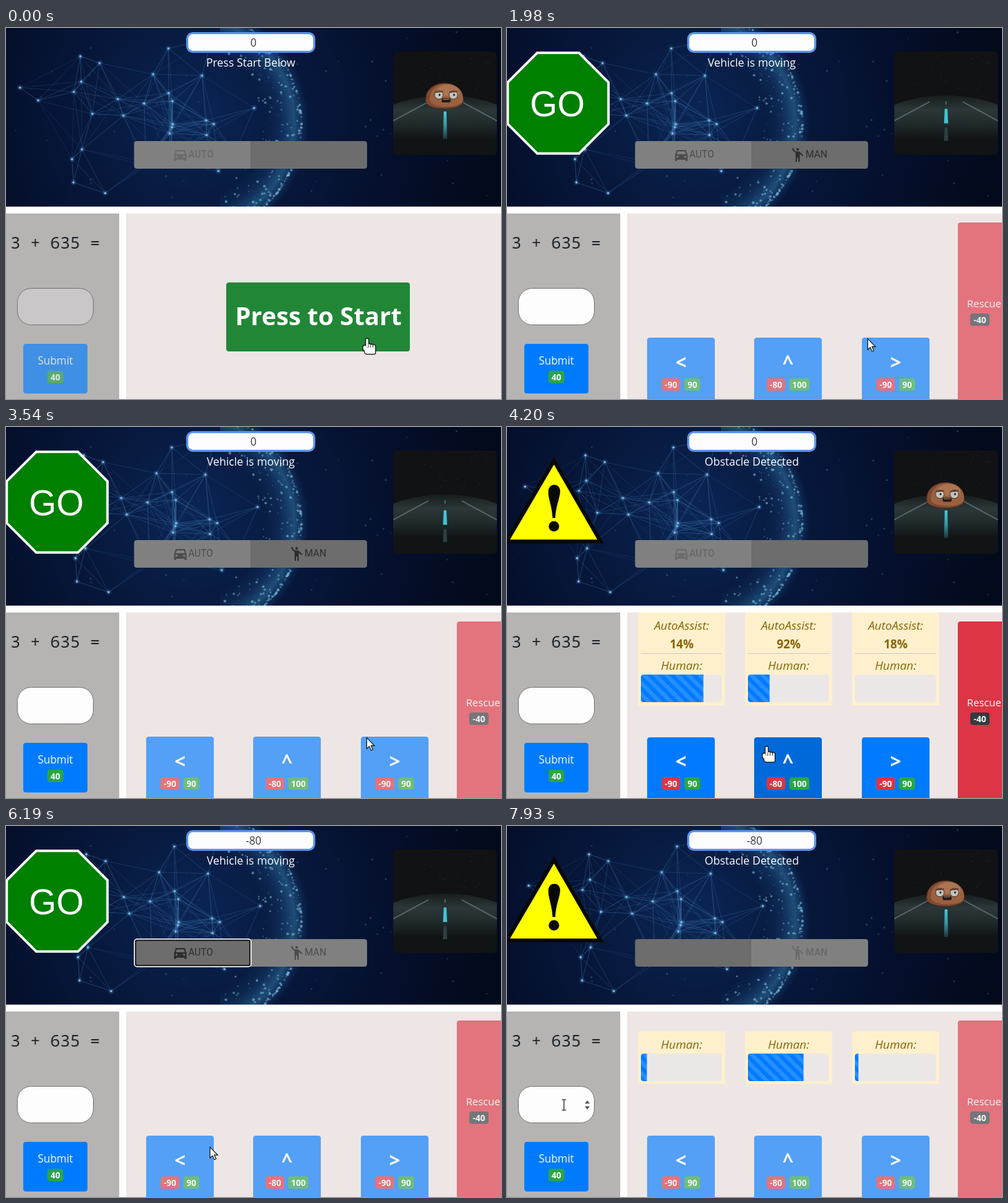
An HTML page with a canvas for the animation above (8000 ms loop, 717 by 538 pixels).

```html
<!DOCTYPE html>
<html lang="en">
<head>
<meta charset="utf-8">
<title>Vehicle control game</title>
<style>
html, body { margin: 0; width: 100%; height: 100%; overflow: hidden; background: #fff; }
canvas { display: block; }
</style>
</head>
<body>
<canvas id="stage" width="717" height="538"></canvas>
<script>
const c = document.getElementById('stage').getContext('2d');
const SANS = '"Open Sans", "Noto Sans", sans-serif';
const PAGE = '#eee6e5', SIDE = '#b5b4b3';
const LOOP = 8000, GO_1 = 1500, STOP_1 = 3660, VOTE = 4590, GO_2 = 4650, AUTO_ON = 5290, STOP_2 = 7400;

const clamp = v => Math.max(0, Math.min(1, v));
const ease = v => { v = clamp(v); return v * v * (3 - 2 * v); };
const mix = (a, b, k) => a + (b - a) * k;
const grey = v => `rgb(${v},${v},${v})`;
const times = (n, make) => Array.from({ length: n }, (_, i) => make(i));

function seeded(seed) {
  return () => (seed = (seed * 16807) % 2147483647) / 2147483647;
}
function paint(fill, stroke, width = 1) {
  if (fill) { c.fillStyle = fill; c.fill(); }
  if (stroke) { c.strokeStyle = stroke; c.lineWidth = width; c.stroke(); }
}
function box(x, y, w, h, r, ...style) {
  c.beginPath();
  c.roundRect(x, y, w, h, r);
  paint(...style);
}
function shape(points, ...style) {
  c.beginPath();
  points.forEach(p => c.lineTo(...p));
  c.closePath();
  paint(...style);
}
function disc(x, y, r, ...style) {
  c.beginPath();
  c.arc(x, y, r, 0, 7);
  paint(...style);
}
function line(x1, y1, x2, y2, color, width = 1) {
  c.beginPath();
  c.moveTo(x1, y1);
  c.lineTo(x2, y2);
  paint(null, color, width);
}
function ramp(gradient, ...colors) {
  colors.forEach((color, i) => gradient.addColorStop(i / (colors.length - 1), color));
  return gradient;
}
// Draws in a frame of its own: moved to x, y and cut to w, h when given
function local(x, y, draw, w, h, r = 0) {
  c.save();
  c.translate(x, y);
  if (w) { box(0, 0, w, h, r); c.clip(); }
  draw();
  c.restore();
}
function text(s, x, y, font, color = '#fff', align = 'center') {
  c.font = font;
  c.textAlign = align;
  c.fillStyle = color;
  c.fillText(s, x, y);
}
const sans = (size, weight = 400, style = '') => `${style} ${weight} ${size}px ${SANS}`;

function badge(s, x, y, w, color) {
  box(x, y, w, 18, 4, color);
  text(s, x + w / 2, y + 13.5, sans(12.3, 700));
}
// Veils a disabled control with the colour behind it
function veil(x, y, w, h, color) {
  c.globalAlpha = 0.35;
  c.fillStyle = color;
  c.fillRect(x, y, w, h);
  c.globalAlpha = 1;
}

// Network globe
const rnd = seeded(71);
const hubs = [[213, 67], [162, 103], [110, 176], [237, 153], [284, 69], [290, 134], [170, 127], [241, 106]];
const nodes = hubs.concat(times(24, () => [20 + 340 * rnd(), 255 * rnd()]));
const links = [];
nodes.forEach((a, i) => nodes.slice(0, i).forEach(b => {
  const d = Math.hypot(a[0] - b[0], a[1] - b[1]);
  if (d < 100) links.push([a, b, 0.5 - d / 260]);
}));
const limb = times(380, () => ({ a: rnd() * 2.3 - 1.15, r: 163 - 60 * rnd() ** 4, k: rnd() }));
const stars = times(60, () => [rnd() * 717, rnd() * 259, rnd()]);

function globe(t) {
  c.fillStyle = ramp(c.createRadialGradient(270, 125, 20, 280, 130, 430), '#0a2452', '#07183c', '#050f2c', '#030a1c');
  c.fillRect(0, 0, 717, 259);
  for (const [x, y, k] of stars) disc(x, y, 0.5 + k, `rgba(75,115,165,${0.12 + 0.3 * k})`);

  c.fillStyle = ramp(c.createRadialGradient(265, 138, 110, 265, 138, 174),
    'rgba(40,110,175,0)', 'rgba(45,120,180,.15)', 'rgba(60,140,190,.45)', 'rgba(30,90,150,0)');
  c.fillRect(310, 0, 130, 259);
  for (const { a, r, k } of limb) {
    const turn = a + 0.01 * Math.sin(t / 1500 + 6 * k);
    disc(265 + r * Math.cos(turn), 138 + r * Math.sin(turn), 0.6 + 1.4 * k, `rgba(125,195,225,${0.15 + 0.5 * k})`);
  }

  const drift = x => x + t * 0.0014;
  for (const [a, b, k] of links) line(drift(a[0]), a[1], drift(b[0]), b[1], `rgba(80,145,200,${k})`);
  for (const [x, y] of nodes) {
    disc(drift(x), y, 4, 'rgba(80,150,215,.2)');
    disc(drift(x), y, 1.7, '#79b8de');
  }
}

// Road view, 150 by 150
function road(t, blocked) {
  c.fillStyle = '#111213';
  c.fillRect(0, 0, 150, 150);
  const r = seeded(9);
  times(26, () => disc(r() * 150, r() * 56, 0.5, 'rgba(150,160,165,.3)'));
  c.beginPath();
  c.ellipse(75, 116, 112, 52, 0, 0, 7);
  paint(ramp(c.createLinearGradient(0, 64, 0, 126), '#181d1e', '#2b3738', '#202a2b', '#111415'));
  for (const side of [-1, 1]) line(75 + side * 24, 73, 75 + side * 76, 101, 'rgba(125,150,150,.55)', 1.8);

  const dash = (y, h, fill) => shape([[73, y], [77, y], [78, y + h], [72, y + h]], fill);
  if (blocked) {
    dash(87, 40, ramp(c.createLinearGradient(0, 87, 0, 127), '#45c9d8', '#3797a2', '#1d3438'));
    rock(Math.sin(t / 130) * 0.6);
  } else {
    const shift = 2 + 2.5 * Math.sin(t / 110);
    line(75, 72, 75, 77, '#477b80', 1.5);
    dash(83 + shift, 21, '#42c3d0');
    dash(110 + shift, 19, '#2c4144');
  }
}
function blob(x, y, w, up, down, ...style) {
  shape(times(40, i => {
    const a = i / 40 * 2 * Math.PI, s = Math.sin(a);
    return [x + w * Math.cos(a) * (1 + 0.12 * s), y + (s < 0 ? up : down) * Math.sign(s) * Math.abs(s) ** 0.8];
  }), ...style);
}
function rock(dy) {
  local(74, 68 + dy, () => {
    blob(0, 0, 27, 22, 15, '#80492f', '#4c2d20');
    blob(3, -1, 24, 20, 13, '#99613f');
    blob(5, -8, 17, 12, 5, '#ad7451');
    for (const x of [-8, 13]) {
      disc(x, -5, 6.2, '#c2c4bd', '#49352d');
      disc(x + 1, -5, 1.4, '#181818');
      line(x - 6, -9, x + 6, -10, '#5f3b2a', 2);
    }
    box(-4, 0, 13, 6, 2, '#2b1915');
    line(-2, 1.5, 7, 1.5, '#8f887c');
  });
}

// Signs
function goSign() {
  shape(times(8, k => {
    const a = (k + 0.5) * Math.PI / 4;
    return [74 + 79 * Math.cos(a), 109 + 79 * Math.sin(a)];
  }), '#008000', '#fff', 3.5);
  text('GO', 73, 128, '51px "Liberation Sans", Arial, sans-serif');
}
function warnSign() {
  shape([[68, 49], [-0.5, 166], [135.5, 166]], '#ff0', '#080808', 5.5);
  c.beginPath();
  c.moveTo(66, 132);
  c.bezierCurveTo(65, 112, 59, 104, 60, 92);
  c.bezierCurveTo(61, 81, 76, 81, 77, 92);
  c.bezierCurveTo(77, 104, 71, 112, 70, 132);
  paint('#080808');
  disc(68, 144, 7.6, '#080808');
}

// Mode switch, icons on a 24 pixel grid
function car(ink) {
  c.beginPath();
  c.roundRect(3, 11, 18, 8, 1);
  for (const x of [6.5, 17.5]) {
    c.moveTo(x + 1.5, 14.5);
    c.arc(x, 14.5, 1.5, 0, 7);
  }
  c.fillStyle = ink;
  c.fill('evenodd');
  shape([[4.2, 12], [6, 6], [18, 6], [19.8, 12]], null, ink, 2);
  for (const x of [3, 18]) box(x, 17, 3, 4, 1, ink);
}
function man(ink) {
  disc(12, 4, 2, ink);
  c.strokeStyle = ink;
  c.lineWidth = 2;
  c.stroke(new Path2D('M5 2Q5.5 8 11 8H14L19.6 13.3'));
  c.fillStyle = ink;
  c.fillRect(9, 7, 6, 9);
  for (const x of [9, 13]) c.fillRect(x, 15, 2, 7);
}
function modeSwitch(auto, moving, focused) {
  const half = (x, on, corners, icon, label) => {
    box(x, 164, 169, 40, corners, grey(mix(128, 109, on)));
    if (!moving && on > 0.5) return;
    const ink = moving ? grey(mix(76, 46, on)) : grey(107);
    local(x + 55, 172, () => icon(ink));
    text(label, x + 78.5, 188, `${moving ? 400 : 600} 14px Roboto, sans-serif`, ink, 'left');
  };
  half(185.5, auto, [4, 0, 0, 4], car, 'AUTO');
  half(354, 1 - auto, [0, 4, 4, 0], man, 'MAN');
  if (focused) {
    box(187.5, 165.5, 166, 37, 3, null, '#101010', 2);
    box(186, 164, 169, 40, 4, null, '#fff', 1.5);
  }
}

// Lower panels
function mathPanel(enabled) {
  c.fillStyle = SIDE;
  c.fillRect(0, 269, 164, 269);
  text('3 + 635 =', 6.5, 320, '24px "Noto Sans Mono", monospace', '#212529', 'left');
  box(16.5, 377.5, 110, 53, 20, enabled ? '#fdfdfd' : '#c9c7c8', '#777');
  box(25, 458, 93, 72, 4, '#007bff');
  text('Submit', 71.5, 488, sans(15.4));
  badge('40', 60, 497, 23, '#28a745');
  if (!enabled) veil(25, 458, 93, 72, SIDE);
}
function votes(x, assist, share) {
  const w = 126, y = assist ? 359 : 330, mid = x + w / 2;
  c.fillStyle = '#fff0cd';
  if (assist) {
    c.fillRect(x, 269, w, 135);
    text('AutoAssist:', mid, 293.5, sans(17, 400, 'italic'), '#856404');
    text(assist, mid, 320.5, sans(17, 700), '#856404');
    line(x + 4, 328.5, x + w - 5, 328.5, '#cfcbc4');
  } else c.fillRect(x, 298, w, 76);
  text('Human:', mid, y - 7.5, sans(17, 400, 'italic'), '#856404');
  box(x + 4, y, w - 9, 40, 4, '#ebe7e6');
  const fill = (w - 9) * share;
  if (fill) local(x + 4, y, () => {
    c.fillStyle = '#007bff';
    c.fillRect(0, 0, fill, 40);
    for (let sx = -48; sx < fill; sx += 16)
      shape([[sx, 0], [sx + 8, 0], [sx + 48, 40], [sx + 40, 40]], 'rgba(255,255,255,.15)');
  }, fill, 40, [4, 0, 0, 4]);
}
const SIGNS = ['<', '^', '>'];
const buttonX = i => Math.round(203 + 155.4 * i);
function controls(active, hover) {
  SIGNS.forEach((sign, i) => {
    const x = buttonX(i), up = i === 1;
    box(x, active ? 450 : 449, 98, 100, 4, active && hover === i ? '#0069d9' : '#007bff');
    text(sign, x + 49, 495, sans(28, 700));
    badge(up ? '-80' : '-90', x + (up ? 18 : 21), 508, 27, '#dc3545');
    badge(up ? '100' : '90', x + (up ? 51 : 54), 508, up ? 29 : 23, '#28a745');
  });
  box(653, 282, 76, 270, 4, '#dc3545');
  text('Rescue', 691, 405, sans(15));
  badge('-40', 671, 414, 28, '#343a40');
  if (!active) veil(174, 269, 543, 269, PAGE);
}

function toast(age) {
  if (age < 0 || age > 1300) return;
  local(13 - 345 * (1 - ease(age / 250)) - 360 * ease((age - 1000) / 300), 0, () => {
    c.fillStyle = '#e74c3c';
    c.fillRect(0, 0, 312, 57);
    c.fillStyle = 'rgba(255,255,255,.7)';
    c.fillRect(0, 52, 312 * clamp(1 - age / 993), 5);
    text('-80', 149, 36, sans(29));
    for (const k of [-4.5, 4.5]) line(291.5, 26 - k, 300.5, 26 + k, '#f5c0b9', 1.8);
  });
}

// Pointer: time, x, y of each stop
const trail = [[3700, 522, 450], [4100, 375, 463], [4640, 375, 463], [5200, 314, 186], [5560, 314, 186],
  [6050, 300, 496], [6500, 277, 361], [7300, 277, 361], [7700, 82, 404]];
function pointerAt(t) {
  const i = trail.findIndex(p => t < p[0]);
  if (i === 0) return trail[0].slice(1);
  if (i < 0) return trail.at(-1).slice(1);
  const [a, b] = trail.slice(i - 1, i + 1), k = ease((t - a[0]) / (b[0] - a[0]));
  return [mix(a[1], b[1], k), mix(a[2], b[2], k)];
}
function hand() {
  c.beginPath();
  times(4, i => c.roundRect(3.3 * i - 1, i ? 7 + 0.7 * i : 0, 3.3, 13, 1.6));
  c.roundRect(-5, 10, 4, 7, 2);
  c.roundRect(-3, 13, 15, 9, 4);
  paint('#fff', '#111', 2.4);
  paint('#fff');
  for (const x of [2.3, 5.6, 8.9]) line(x, 9, x, 13, '#111', 0.8);
}
function beam() {
  line(0, -7, 0, 7, '#222', 1.2);
  for (const y of [-7.5, 7.5]) line(-3, y, 3, y, '#222', 1.2);
}
function arrow() {
  shape([[0, 0], [0, 16], [3.7, 12.6], [6.3, 18.4], [8.8, 17.3], [6.2, 11.6], [11.2, 11.6]], '#fff', '#111', 1.1);
}

function draw(t) {
  const begun = t >= GO_1;
  const moving = (begun && t < STOP_1) || (t >= GO_2 && t < STOP_2);
  const auto = clamp((t - AUTO_ON) / 160);
  const active = begun && !moving && !auto;
  const [x, y] = pointerAt(t);
  const within = (l, top, w, h) => x >= l && x < l + w && y >= top && y < top + h;
  const hover = SIGNS.findIndex((_, i) => within(buttonX(i), 449, 98, 89));
  const inField = within(16, 377, 111, 54);
  const onSwitch = moving && within(186, 164, 337, 40);

  c.fillStyle = '#fff';
  c.fillRect(0, 0, 717, 538);
  local(0, 0, () => globe(t), 717, 259);
  local(561, 34, () => road(t, !moving), 150, 150, 6);
  if (begun) moving ? goSign() : warnSign();
  box(262.5, 7.5, 184, 27, 8, '#fdfdfd', '#5c95ee', 3);
  text(t < VOTE ? '0' : '-80', 358.5, 27, sans(15.5), '#343a40');
  text(!begun ? 'Press Start Below' : moving ? 'Vehicle is moving' : 'Obstacle Detected', 354.5, 56, sans(16));
  modeSwitch(auto, moving, auto > 0 && moving);

  mathPanel(begun);
  c.fillStyle = PAGE;
  c.fillRect(174, 269, 543, 269);
  if (!begun) {
    box(319, 369, 266, 100, 4, '#228637');
    text('Press to Start', 452.5, 431, sans(36, 700));
  } else {
    controls(active, hover);
    if (!moving) {
      const grow = clamp((t - (auto ? STOP_2 : STOP_1)) / 530);
      const shares = auto ? [0.075, 0.69, 0.045] : [0.775, 0.27, 0];
      const hints = auto ? [] : ['14%', '92%', '18%'];
      shares.forEach((share, i) => votes(190 + 155 * i, hints[i], share * grow));
    }
  }
  toast(t - VOTE);
  if (inField) for (const k of [-1, 1])
    shape([[112.5, 404.5 + 2 * k], [120, 404.5 + 2 * k], [116.2, 404.5 + 6.5 * k]], '#555');
  const kind = inField ? beam : !begun || onSwitch || (active && hover >= 0) ? hand : arrow;
  local(Math.round(x) + 0.5, Math.round(y) + 0.5, kind);
}

function tick() {
  draw(performance.now() % LOOP);
  requestAnimationFrame(tick);
}
tick();
</script>
</body>
</html>
```
